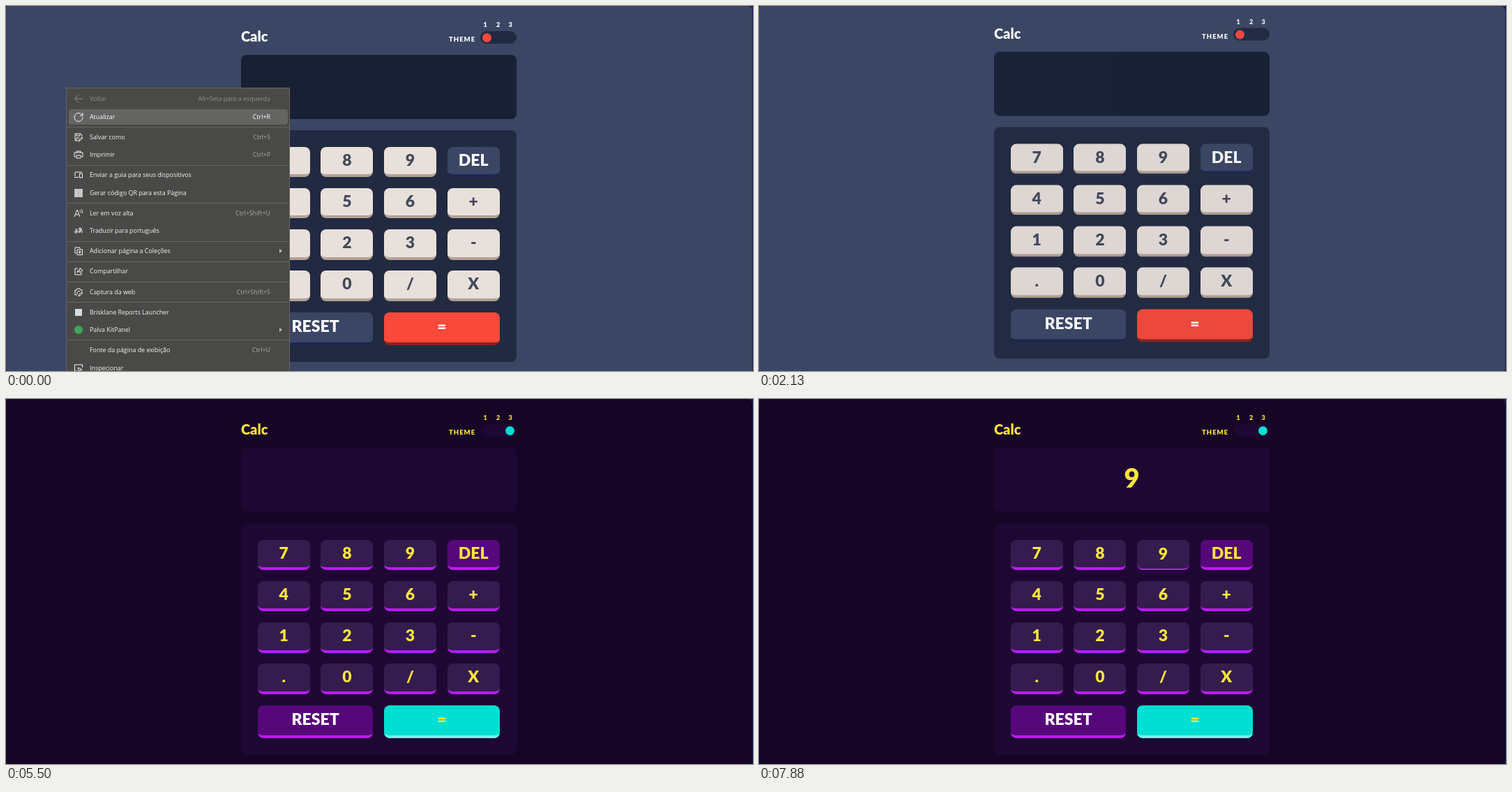
Write an HTML page that moves like this. It is 1071 px wide and 523 px high and loops after 8000 ms.

```html
<!DOCTYPE html>
<html lang="pt">
<head>
<meta charset="utf-8">
<style>
  html, body { margin: 0; width: 100%; height: 100%; overflow: hidden; background: #131c55; }
  #page { position: absolute; width: 1070px; height: 523px; overflow: hidden; border-radius: 4px 7px 3px 3px; background: var(--bg); }
  #page * { position: absolute; box-sizing: border-box; white-space: pre; }
  .t1 { --bg: #3a4663; --screen: #182033; --pad: #222a41; --ink: #fff;
        --key: #e8e0da; --edge: #b2a295; --text: #434a5a;
        --alt: #3a4663; --altEdge: #1b2850; --del: #fff;
        --eq: #f8493a; --eqEdge: #8c231b; --eqText: #fff; }
  .t2 { --bg: #e6e6e6; --screen: #ededed; --pad: #d0cbcb; --ink: #35352c;
        --key: #e4e3df; --edge: #a69d91; --text: #33332b;
        --alt: #377f86; --altEdge: #1b6066; --del: #fff;
        --eq: #c85402; --eqEdge: #873901; --eqText: #fff; }
  .t3 { --bg: #160525; --screen: #1e0833; --pad: #1e0833; --ink: #ffe53d;
        --key: #341c4e; --edge: #b91bee; --text: #ffe53d;
        --alt: #56077a; --altEdge: #b91bee; --del: #ffe53d;
        --eq: #00dfd2; --eqEdge: #6cf9f1; --eqText: #ffe53d; }
  #calc { inset: 0; font: 900 23px Lato, sans-serif; color: var(--ink); }
  #title { left: 337px; top: 33px; font-size: 20px; line-height: 20px; }
  #theme { left: 635px; top: 43px; font-size: 9.5px; line-height: 10px; letter-spacing: 1px; }
  .num { top: 22px; width: 10px; font-size: 9px; line-height: 10px; text-align: center; }
  #track { left: 680px; top: 36px; width: 52px; height: 18px; border-radius: 9px; background: var(--pad); }
  #dot { top: 38.5px; width: 13px; height: 13px; border-radius: 50%; background: var(--eq); }
  #screen { left: 337px; top: 70px; width: 395px; height: 92px; border-radius: 8px; background: var(--screen);
            font-size: 38px; line-height: 84px; text-align: center; }
  #pad { left: 337px; top: 178px; width: 395px; height: 332px; border-radius: 8px; background: var(--pad); }
  #pad div { width: 75px; height: 43.5px; border-radius: 8px; border-bottom: 4px solid var(--edge);
             background: var(--key); color: var(--text); line-height: 36px; text-align: center; }
  #pad .wide { width: 165.7px; height: 47.5px; line-height: 38px; }
  #pad .alt { background: var(--alt); border-color: var(--altEdge); color: #fff; }
  #pad .del { color: var(--del); }
  #pad .eq { background: var(--eq); border-color: var(--eqEdge); color: var(--eqText); }
  #pad .down { border-bottom-width: 2px; line-height: 38px; }
  #menu { left: 86px; top: 117px; width: 321px; height: 420px; border: 1px solid #656663; background: #494a47;
          font: 8.9px "Open Sans", sans-serif; color: #f4f4f4; }
  #menu span { line-height: 14px; }
  #menu .name { left: 33px; }
  #menu .hint { right: 27px; color: #a9aaa8; }
  #menu .off { color: #8d8e8b; }
  #menu .hot { color: #fff; }
  #menu hr { left: 0; width: 100%; height: 1px; margin: 0; border: 0; background: #656663; }
  #glow { left: 3px; top: 30px; width: 314px; height: 22px; border-radius: 4px; background: #646563; }
  #menu svg { left: 10px; width: 14px; height: 14px; fill: none; stroke: currentColor; }
</style>
</head>
<body>
<div id="page">
  <div id="calc">
    <div id="title">Calc</div>
    <div id="theme">THEME</div>
    <div class="num" style="left:682px">1</div>
    <div class="num" style="left:700.5px">2</div>
    <div class="num" style="left:718px">3</div>
    <div id="track"></div>
    <div id="dot"></div>
    <div id="screen"></div>
    <div id="pad"></div>
  </div>
  <div id="menu"><div id="glow"></div></div>
</div>
<script>
const $ = id => document.getElementById(id);
const keys = {};

function addKey(label, col, row, cls = '') {
  const key = document.createElement('div');
  key.textContent = label;
  key.className = cls;
  key.style.left = 23.7 + col * 90.67 + 'px';
  key.style.top = 23.5 + row * 59.25 + 'px';
  $('pad').append(key);
  keys[label] = key;
}
['7', '8', '9', 'DEL', '4', '5', '6', '+', '1', '2', '3', '-', '.', '0', '/', 'X'].forEach((label, i) =>
  addKey(label, i % 4, i >> 2, label == 'DEL' ? 'alt del' : ''));
addKey('RESET', 0, 4, 'wide alt');
addKey('=', 2, 4, 'wide eq');

// Middle of the row, label, shortcut, icon, extra class
const items = [
  [133, 'Voltar', 'Alt+Seta para a esquerda', '<path d="M13 7H1.5M7 1.5L1.5 7 7 12.5"/>', 'off'],
  [159, 'Atualizar', 'Ctrl+R', '<path d="M12.5 5A6 6 0 1 0 13 7M13 1V5H9"/>', 'hot'],
  [188, 'Salvar como', 'Ctrl+S', '<path d="M6 12H2V2H10L12 4V6M4 2V5H9V2M4 12V8H8M7 13L8 10 12 7 13 8 9 12Z"/>'],
  [213, 'Imprimir', 'Ctrl+P', '<path d="M4 4V2H10V4M3 10H1V4H13V10H11M4 8H10V12H4Z"/>'],
  [242, 'Enviar a guia para seus dispositivos', '', '<path d="M2 9V3H12M1 10.5H7M8.5 5H12.5V11H8.5Z"/>'],
  [268, 'Gerar código QR para esta Página', '', '<path d="M2 2H6V6H2ZM8 2H12V6H8ZM2 8H6V12H2ZM8 8H12V12H8ZM4 3V5M10 3V5M4 9V11M10 9V11" stroke-width="1.4"/>'],
  [297, 'Ler em voz alta', 'Ctrl+Shift+U', '<path d="M1 12L5 2 9 12M2.5 9H7.5M8.5 3Q10 4 9.5 6M10.5 1Q13.5 3 12 7"/>'],
  [322, 'Traduzir para português', '', '<path d="M2 5H5V10H2V7.500H5M7 4H12M9 2V9M12 6Q7 6 7 9 10 11 11 5M11 10Q14 9 12 7"/>'],
  [351, 'Adicionar página a Coleções', '>', '<path d="M4 10H2V2H9V4M5 5H12.500V12.500H5ZM8.700 6.500V11M6.500 8.700H11"/>'],
  [380, 'Compartilhar', '', '<path d="M6 3H2V12H11V9M5 9Q5 5 9 5V2.500L13 6 9 9V7Q7 7 5 9Z"/>'],
  [410, 'Captura da web', 'Ctrl+Shift+S', '<path d="M5 11H2V4H4L5 2H9L10 4H12V6M9 6A2.500 2.500 0 1 0 6 10M7 13L8 10 12 7 13 8 9 12Z"/>'],
  [439, 'Brisklane Reports Launcher', '', '<path d="M2 2H12V12H2Z" fill="#d5dde2" stroke="none"/>'],
  [464, 'Palva KitPanel', '>', '<circle cx="7" cy="7" r="6" fill="#3fa45b" stroke="none"/>'],
  [493, 'Fonte da página de exibição', 'Ctrl+U', ''],
  [519, 'Inspecionar', '', '<path d="M5 11H1.500V2H12.500V6M6 6L12 9 9 10 8 13Z"/>']
];
const menuTop = 118;
let rows = '';
for (const [y, name, hint, icon, cls = ''] of items) {
  const top = `style="top:${y - menuTop - 7}px"`;
  rows += `<svg class="${cls}" viewBox="0 0 14 14" ${top}>${icon}</svg><span class="name ${cls}" ${top}>${name}</span>`;
  rows += hint == '>'
    ? `<svg viewBox="0 0 14 14" style="left:300px;top:${y - menuTop - 7}px"><path d="M5 4L9 7 5 10Z" fill="#bbb" stroke="none"/></svg>`
    : `<span class="hint ${cls}" ${top}>${hint}</span>`;
}
for (const y of [173, 228, 282, 337, 366, 395, 424, 478]) rows += `<hr style="top:${y - menuTop}px">`;
$('menu').insertAdjacentHTML('beforeend', rows);

const dotX = [0, 689, 705.5, 722];
const themeAt = t => t < 3375 ? 1 : t < 5500 ? 2 : t < 6125 ? 3 : t < 6750 ? 1 : 3;

function render(now) {
  // The picture advances eight times a second
  const t = Math.floor(now % 8000 / 125) * 125;
  const theme = themeAt(t);
  $('page').className = 't' + theme;
  $('dot').style.left = dotX[theme] - 6.5 + 'px';
  $('menu').style.display = t < 875 ? '' : 'none';

  // After the reload the calculator drops in and fades, easing out
  const loading = t >= 1125 && t < 2625;
  const left = loading ? ((2650 - t) / 2180) ** 2 : 0;
  $('calc').style.opacity = t == 1125 ? 0 : 1 - left;
  $('calc').style.transform = loading ? `translateY(${-77 * left}px)` : 'none';

  keys.DEL.classList.toggle('down', t == 7375);
  keys[9].classList.toggle('down', t >= 7750);
  $('screen').textContent = t >= 7875 ? '9' : '';
}

const start = performance.now();
function tick() {
  render(performance.now() - start);
  requestAnimationFrame(tick);
}
tick();
</script>
</body>
</html>
```
